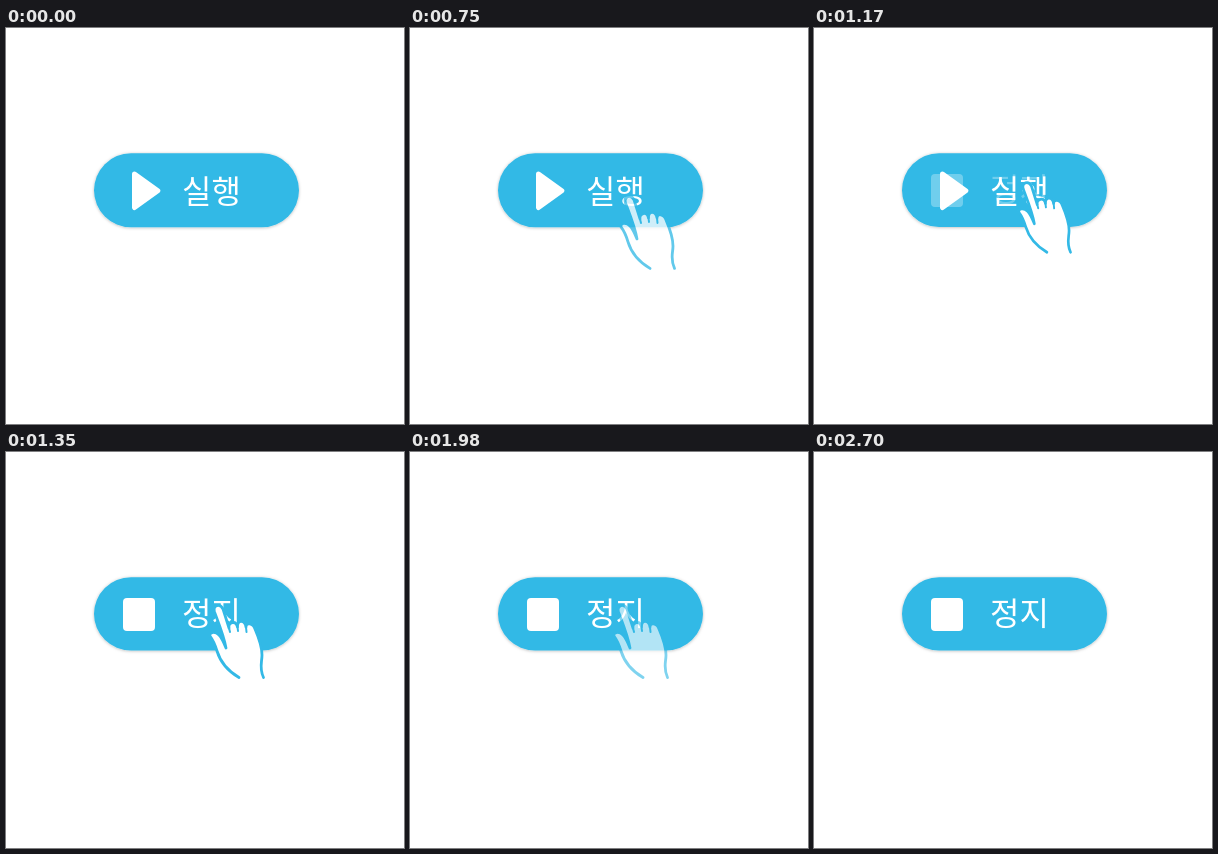
These frames come from a looping animation (398 by 396 pixels, 5430 ms). An HTML page:

```html
<!DOCTYPE html>
<html lang="ko">
<head>
<meta charset="utf-8">
<title>실행 버튼</title>
<style>
  html, body { margin: 0; width: 100%; height: 100%; overflow: hidden; background: #fff; }
  svg { display: block; width: 398px; height: 396px; }
  text {
    font: 300 32px "Noto Sans CJK KR", "Noto Sans CJK", "Noto Sans KR", sans-serif;
    fill: #fff;
    text-anchor: middle;
  }
</style>
</head>
<body>
<svg viewBox="0 0 398 396">
  <defs>
    <filter id="shadow" x="-10%" y="-20%" width="120%" height="140%">
      <feDropShadow dx="0" dy="0.5" stdDeviation="1.6" flood-color="#000" flood-opacity="0.28"/>
    </filter>
  </defs>

  <rect id="button" x="88" y="125.3" width="205" height="74" rx="37" fill="#33b9e6" filter="url(#shadow)"/>

  <g id="stop">
    <rect x="117" y="146" width="32" height="33" rx="4" fill="#fff"/>
    <text x="205.5" y="172.5">정지</text>
  </g>

  <g id="run">
    <path d="M128.5 146 L151.8 162.7 L128.5 179.5 Z" fill="#fff" stroke="#fff" stroke-width="5" stroke-linejoin="round"/>
    <text x="205.5" y="175">실행</text>
  </g>

  <g id="hand" fill="#fff" stroke="#33b9e6" stroke-width="2.8" stroke-linecap="round" stroke-linejoin="round">
    <path d="M233 225.5 C222 219 214 209 211 199 C209 192 207 188 204 184
             C203 180 209 179 213 183 C216 186 218 191 220 196
             C218 184 213 172 208.5 160 C206.5 153 214 151 217 157
             L223 176 C222 170 230 168 231.5 175
             C231 167 239 168 240 175 C240 170 247 171 249 177
             C252 184 256 194 256 203 C256 210 253 216 257.5 225.5"/>
    <path d="M223 176 L224 180 M231.5 175 L232 179 M240 175 L240.5 180" fill="none" stroke-width="2"/>
  </g>
</svg>

<script>
const LOOP = 5430, STEP = 30;
const [button, run, stop, hand] = ["button", "run", "stop", "hand"].map(id => document.getElementById(id));

const progress = (t, from, to) => Math.min(1, Math.max(0, (t - from) / (to - from)));
const easeOut = p => 1 - (1 - p) ** 3;

function draw(t) {
  const arrive = easeOut(progress(t, 550, 1070));
  const leave = progress(t, 1800, 2280);
  const press = Math.sin(Math.PI * progress(t, 1070, 1270));
  const stopIn = progress(t, 1110, 1310);
  const runOut = progress(t, 1170, 1340);

  const dx = 30 * (1 - arrive), dy = 64 * (1 - arrive);
  const scale = 1 - 0.035 * press;
  hand.setAttribute("transform",
    `translate(${dx + 230} ${dy + 190}) scale(${scale}) translate(-230 -190)`);
  hand.setAttribute("opacity", arrive * (1 - leave));

  stop.setAttribute("opacity", stopIn);
  run.setAttribute("opacity", 1 - runOut);
  button.setAttribute("height", 74 - 0.8 * stopIn);
}

function frame() {
  const t = performance.now() % LOOP;
  draw(Math.floor(t / STEP) * STEP);
  requestAnimationFrame(frame);
}
frame();
</script>
</body>
</html>
```
